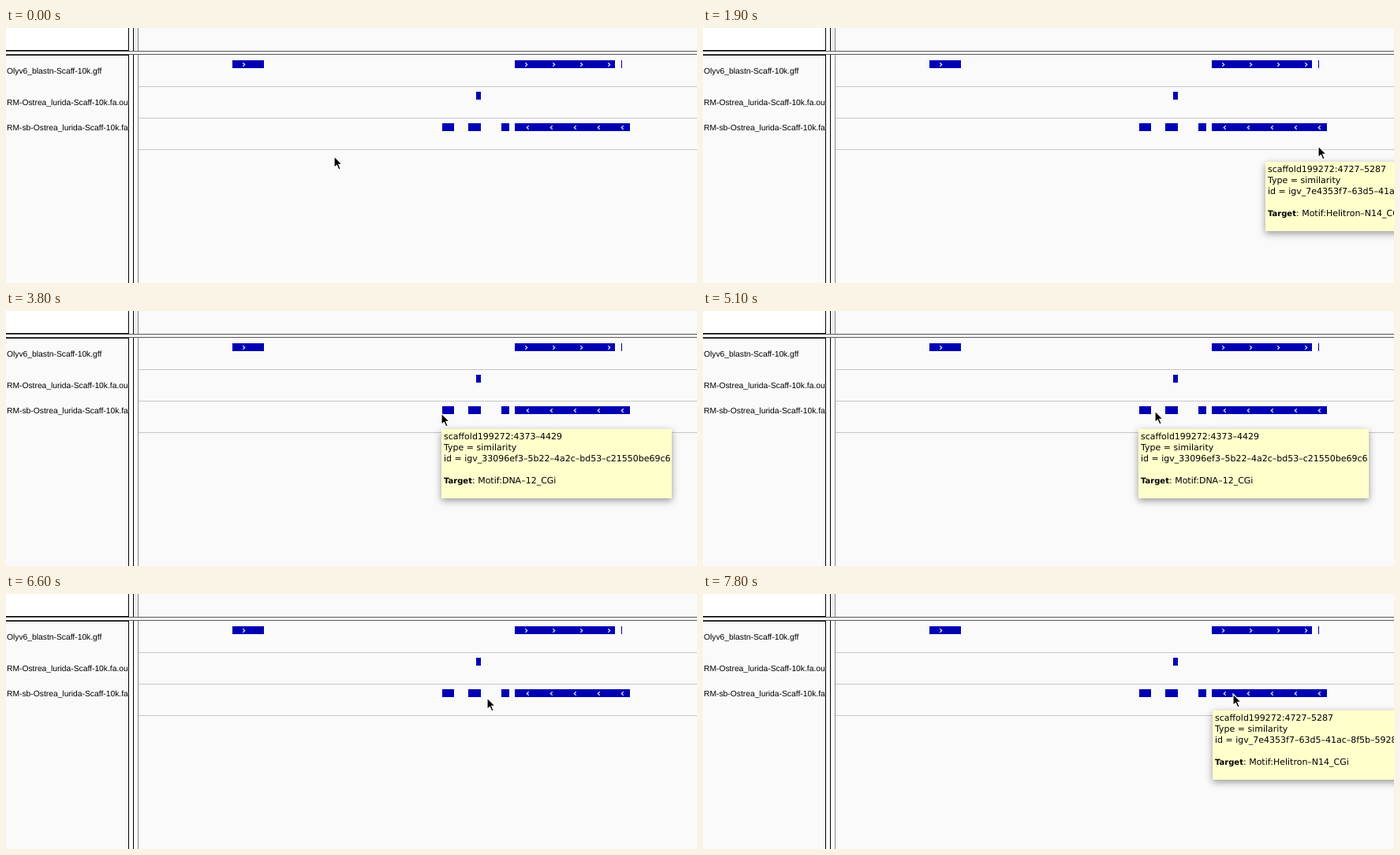
An HTML page with a canvas for the animation above (8000 ms loop, 876 by 324 pixels).

```html
<!DOCTYPE html>
<html lang="en">
<head>
<meta charset="utf-8">
<title>Genome tracks</title>
<style>
html, body { margin: 0; width: 100%; height: 100%; overflow: hidden; background: #fafafa; }
canvas { display: block; }
</style>
</head>
<body>
<canvas id="stage" width="876" height="324"></canvas>
<script>
const ctx = document.getElementById('stage').getContext('2d');
const LOOP = 8000, STEP = 100;

const tracks = [
  { label: 'Olyv6_blastn-Scaff-10k.gff', drop: 17, bars: [[287, 40], [645, 127], [780, 1]],
    first: 14, gap: 35, dir: 1 },
  { label: 'RM-Ostrea_lurida-Scaff-10k.fa.out', drop: 17, bars: [[596, 6]],
    first: 14, gap: 35, dir: 1 },
  { label: 'RM-sb-Ostrea_lurida-Scaff-10k.fa', drop: 9, bars: [[553, 15], [586, 16], [628, 10], [645, 146]],
    first: 16, gap: 30, dir: -1 }
];

const feature = (range, id, motif) => ({ range, id, motif });
const dna = feature('4373–4429', '33096ef3–5b22–4a2c–bd53–c21550be69c6', 'DNA–12_CGi');
const helitron27 = feature('4500–4559', '7f1d8f8e–7c76–4c4a–8062–e9c0773383a6', 'Helitron–27_CGi');
const helitronN2 = feature('4663–4698', 'bee6a71d–aba1–4db6–bb8e–223c6f90d15a', 'Helitron–N2f_CGi');
const helitronN14 = feature('4727–5287', '7e4353f7–63d5–41ac–8f5b–59284d1a07c3', 'Helitron–N14_CGi');

// Pointer moves: start, end, destination, feature hovered on arrival
const home = { x: 416, y: 163 };
const moves = [
  [400, 800, 79, 60], [800, 1100, 680, 47], [1100, 1300, 303, 161], [1300, 1400, 76, 173],
  [1500, 1800, 713, 150, helitronN14], [1800, 1900, 780, 150],
  [2400, 2800, 700, 48], [2800, 3200, 568, 171],
  [3300, 3600, 552, 130, dna], [4200, 5100, 573, 127],
  [5200, 5400, 591, 131, helitron27], [5900, 6100, 600, 133],
  [6500, 6800, 639, 128, helitronN2],
  [7400, 7500, 646, 128, helitronN14], [7500, 7800, 672, 127]
].map(([start, end, x, y, hit]) => ({ start, end, x, y, hit }));

function rect(color, x, y, w, h) {
  ctx.fillStyle = color;
  ctx.fillRect(x, y, w, h);
}

function write(text, x, y, font) {
  ctx.font = font;
  ctx.fillStyle = '#000';
  ctx.fillText(text, x, y);
  return x + ctx.measureText(text).width;
}

function drawPanels() {
  rect('#fafafa', 0, 0, 876, 324);
  rect('#fff', 0, 0, 155, 28);
  rect('#fff', 156, 0, 5, 324);
  rect('#eee', 162, 0, 5, 28);
  rect('#fff', 162, 35, 5, 289);
  for (const [x, color] of [[155, '#000'], [161, '#000'], [167, '#888']]) rect(color, x, 0, 1, 324);
  rect('#fff', 0, 29, 876, 5);
  for (const y of [28, 34]) rect('#000', 0, y, 156, 1);
  for (const y of [29, 33]) rect('#555', 0, y, 876, 1);
}

function drawTrack({ label, drop, bars, first, gap, dir }, row) {
  const top = 41 + 40 * row, mid = top + 5.5;
  ctx.save();
  ctx.beginPath();
  ctx.rect(0, 35, 155, 289);
  ctx.clip();
  write(label, 1, top + drop, '10.3px "Liberation Sans", Arial, sans-serif');
  ctx.restore();

  rect('#c6c6cb', 168, top + 33, 708, 1);
  ctx.strokeStyle = '#e4e4f8';
  ctx.lineWidth = 1.2;
  for (const [x, width] of bars) {
    rect('#0000b2', x, top, width, 10);
    for (let tip = x + first; tip < x + width; tip += gap) {
      const front = tip + 0.5 + dir * 1.2, back = tip + 0.5 - dir * 1.2;
      ctx.beginPath();
      ctx.moveTo(back, mid - 2.2);
      ctx.lineTo(front, mid);
      ctx.lineTo(back, mid + 2.2);
      ctx.stroke();
    }
  }
}

function pointerAt(t) {
  const i = moves.findLastIndex(move => t >= move.start);
  if (i < 0) return home;
  const from = moves[i - 1] || home, to = moves[i];
  const k = Math.min(1, (t - to.start) / (to.end - to.start));
  const ease = k * k * (3 - 2 * k);
  return { x: from.x + (to.x - from.x) * ease, y: from.y + (to.y - from.y) * ease };
}

// A tip stays until the pointer strays from it or heads for another feature
function drawTip(t, pointer) {
  const hover = moves.findLast(move => move.hit && t > move.start);
  if (!hover || t < hover.end) return;
  if (Math.hypot(pointer.x - hover.x, pointer.y - hover.y) > 80) return;
  const { range, id, motif } = hover.hit;
  const left = hover.x + 3, top = hover.y + 20;
  const plain = '11px "DejaVu Sans", sans-serif';
  ctx.save();
  ctx.shadowColor = 'rgba(0,0,0,.4)';
  ctx.shadowBlur = 9;
  ctx.shadowOffsetY = 3;
  rect('#ffffcc', hover.x, top, 292, 88);
  ctx.restore();
  ['scaffold199272:' + range, 'Type = similarity', 'id = igv_' + id]
    .forEach((line, i) => write(line, left, top + 13 + 14 * i, plain));
  const end = write('Target', left, top + 69, 'bold 10px "DejaVu Sans", sans-serif');
  write(': Motif:' + motif, end, top + 69, plain);
}

const arrow = new Path2D('M0 0V14.5L3.3 11.4L5.8 17L8.2 16L5.8 10.4H10.2Z');

function drawPointer({ x, y }) {
  ctx.save();
  ctx.translate(Math.round(x), Math.round(y));
  ctx.fillStyle = '#000';
  ctx.fill(arrow);
  ctx.strokeStyle = '#fff';
  ctx.lineWidth = 1.2;
  ctx.stroke(arrow);
  ctx.restore();
}

function draw() {
  const t = Math.floor(performance.now() % LOOP / STEP) * STEP;
  const pointer = pointerAt(t);
  ctx.textRendering = 'geometricPrecision';
  drawPanels();
  tracks.forEach(drawTrack);
  drawTip(t, pointer);
  drawPointer(pointer);
  requestAnimationFrame(draw);
}
draw();
</script>
</body>
</html>
```
